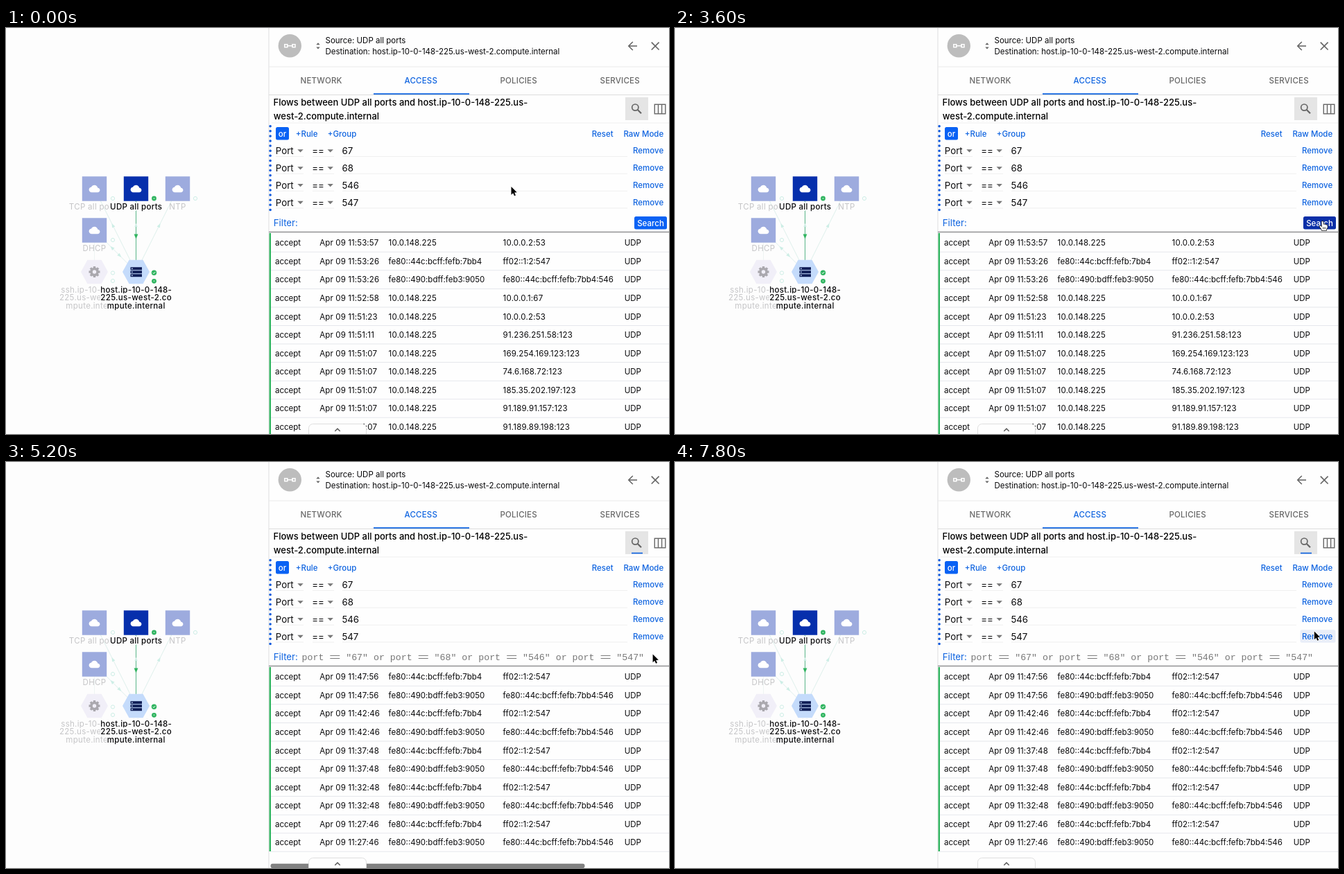
Write an HTML page with a canvas that moves like this. It is 956x586 px and loops after 8 s.

```html
<!DOCTYPE html>
<html lang="en">
<head>
<meta charset="utf-8">
<title>Flow filter</title>
<style>
html, body { margin: 0; width: 100%; height: 100%; overflow: hidden; background: #fdfdfd; }
canvas { display: block; width: 956px; height: 586px; }
</style>
</head>
<body>
<canvas id="stage"></canvas>
<script>
const W = 956, H = 586, LOOP = 8000, STEP = 200;
const UI = 'Inter, sans-serif', MONO = '"Liberation Mono", monospace';
const S = 11.505, L = 13.275;
const INK = '#08080a', BLUE = '#0f64e0', FILL = '#0a62f4', NAVY = '#062fac', GREEN = '#2fb45f', GREY = '#666';
const PALE = '#cdeee6';

const canvas = document.getElementById('stage');
const scale = window.devicePixelRatio || 1;
canvas.width = W * scale;
canvas.height = H * scale;
const c = canvas.getContext('2d');

// y is the middle of the capitals
function text(str, x, y, { size = S, weight = 400, color = INK, family = UI, align = 'left', spacing = 0 } = {}) {
  c.font = `${weight} ${size}px ${family}`;
  c.letterSpacing = spacing + 'px';
  c.textAlign = align;
  c.fillStyle = color;
  c.fillText(str, x, y + size * 0.362);
}

function rect(x, y, w, h, color, r = 0) {
  c.fillStyle = color;
  c.beginPath();
  c.roundRect(x, y, w, h, r);
  c.fill();
}

function disc(x, y, r, color) {
  c.fillStyle = color;
  c.beginPath();
  c.arc(x, y, r, 0, Math.PI * 2);
  c.fill();
}

function ring(x, y, r, color, width = 1) {
  c.strokeStyle = color;
  c.lineWidth = width;
  c.beginPath();
  c.arc(x, y, r, 0, Math.PI * 2);
  c.stroke();
}

function trace(points, closed) {
  c.beginPath();
  points.forEach(([x, y], i) => i ? c.lineTo(x, y) : c.moveTo(x, y));
  if (closed) c.closePath();
}

function line(points, color, width = 1) {
  trace(points);
  c.strokeStyle = color;
  c.lineWidth = width;
  c.stroke();
}

function shape(points, color) {
  trace(points, true);
  c.fillStyle = color;
  c.fill();
}

function arrowHead(x, y, angle, r, color) {
  c.save();
  c.translate(x, y);
  c.rotate(angle);
  shape([[r, 0], [-r, -r * 0.8], [-r, r * 0.8]], color);
  c.restore();
}

// ---- graph ----
const CLOUD = new Path2D('M19.35 10.04C18.67 6.59 15.64 4 12 4 9.11 4 6.6 5.64 5.35 8.04 ' +
  '2.34 8.36 0 10.91 0 14c0 3.31 2.69 6 6 6h13c2.76 0 5-2.24 5-5 0-2.64-2.05-4.78-4.65-4.96z');

function service(x, y, color) {
  rect(x - 17.7, y - 17.7, 35.4, 35.4, color);
  c.save();
  c.translate(x, y);
  c.scale(0.66, 0.66);
  c.translate(-12, -12);
  c.fillStyle = '#fff';
  c.fill(CLOUD);
  c.restore();
}

function hexagon(x, y, color) {
  shape([[-19.5, 0], [-10, -17.3], [10, -17.3], [19.5, 0], [10, 17.3], [-10, 17.3]]
    .map(([dx, dy]) => [x + dx, y + dy]), color);
}

function gear(x, y) {
  c.fillStyle = '#aaa8ae';
  for (let i = 0; i < 8; i++) {
    c.save();
    c.translate(x, y);
    c.rotate(i * Math.PI / 4);
    c.fillRect(-1.7, -8, 3.4, 4);
    c.restore();
  }
  ring(x, y, 4.5, '#aaa8ae', 3.6);
}

function label(lines, x, y, color, solid) {
  lines.forEach((str, i) => {
    const ly = y + i * 11.6;
    if (solid) {
      c.font = `500 ${S}px ${UI}`;
      c.letterSpacing = '0.3px';
      const w = c.measureText(str).width;
      rect(x - w / 2 - 0.5, ly - 6, w + 1, 12, '#fdfdfd');
    }
    text(str, x, ly, { weight: solid ? 500 : 400, color, align: 'center', spacing: 0.3 });
  });
}

function edge(x1, y1, x2, y2, heads) {
  line([[x1, y1], [x2, y2]], '#def0ec', 1);
  const angle = Math.atan2(y2 - y1, x2 - x1);
  for (const [at, turn] of heads)
    arrowHead(x1 + (x2 - x1) * at, y1 + (y2 - y1) * at, angle + turn, 3, PALE);
}

function graph() {
  edge(127.5, 232, 187.5, 352, [[0.44, Math.PI]]);
  edge(247.5, 232, 187.5, 352, [[0.44, Math.PI]]);
  edge(127.5, 292, 187.5, 352, [[0.42, Math.PI], [0.61, 0]]);
  line([[127.5, 310], [127.5, 335]], '#eef4f3');
  line([[187.5, 250], [187.5, 335]], '#63ba90', 1.1);
  arrowHead(187.5, 284.5, -Math.PI / 2, 2.6, PALE);
  arrowHead(187.5, 301, Math.PI / 2, 3.6, GREEN);

  const faded = '#9dabde';
  service(127.5, 232, faded);
  service(247.5, 232, faded);
  service(127.5, 292, faded);
  service(187.5, 232, NAVY);
  hexagon(127.5, 352, '#f1eff8');
  gear(127.5, 352);
  hexagon(187.5, 352, '#c4dbfb');
  for (let i = 0; i < 3; i++) {
    rect(179.5, 345.2 + i * 5, 16.5, 4, '#101f57');
    rect(181, 346.5 + i * 5, 1.6, 1.4, '#c4dbfb');
  }

  for (const [x, y] of [[154, 246], [273, 246], [154, 306], [154, 353.5], [154, 365]]) ring(x, y, 2.6, PALE);
  for (const [x, y, r] of [[213.5, 246, 3.4], [213.5, 353.2, 3.7], [213.5, 365.3, 3.4]]) disc(x, y, r, GREEN);
  line([[211.7, 353.2], [213, 354.6], [215.4, 351.9]], '#fff', 1);
  disc(213.5, 246, 1, '#9fe0b7');
  disc(213.5, 365.3, 1, '#9fe0b7');

  const dim = '#c5c5c7';
  label(['TCP all ports'], 127.5, 257.6, dim);
  label(['NTP'], 247.5, 257.6, dim);
  label(['DHCP'], 127.5, 317.6, dim);
  label(['ssh.ip-10-0-148-', '225.us-west-2.co', 'mpute.internal'], 127.5, 377.5, dim);
  label(['UDP all ports'], 187.7, 257.6, INK, true);
  label(['host.ip-10-0-148-', '225.us-west-2.co', 'mpute.internal'], 187.7, 377.5, INK, true);
}

// ---- panel ----
function header() {
  rect(379, 0, 577, H, '#fefefe');
  rect(378.5, 0, 1, H, '#dededf');
  disc(409.3, 25.7, 16.7, '#bdbdbd');
  line([[405, 25.7], [414, 25.7]], '#fff', 1.5);
  c.strokeStyle = '#fff';
  c.lineWidth = 1.5;
  c.strokeRect(401.8, 23.7, 4, 4);
  c.strokeRect(413, 23.7, 4, 4);
  shape([[447.3, 24.2], [450, 21.2], [452.7, 24.2]], GREY);
  shape([[447.3, 27.6], [450, 30.6], [452.7, 27.6]], GREY);
  text('Source: UDP all ports', 460.5, 18);
  text('Destination: host.ip-10-0-148-225.us-west-2.compute.internal', 460.5, 34.2);
  line([[910, 26], [898, 26]], GREY, 1.6);
  line([[903.8, 20], [897.8, 26], [903.8, 32]], GREY, 1.6);
  line([[930.8, 20.7], [941.6, 31.5]], GREY, 1.7);
  line([[941.6, 20.7], [930.8, 31.5]], GREY, 1.7);

  rect(379, 55.5, 577, 1, '#ececec');
  rect(379, 96, 577, 1, '#dcdcdc');
  const tabs = [['NETWORK', 424.5], ['ACCESS', 574.5], ['POLICIES', 712.5], ['SERVICES', 856.5]];
  for (const [name, x] of tabs)
    text(name, x, 76.3, { weight: 500, color: name === 'ACCESS' ? BLUE : GREY, spacing: 0.2 });
  rect(530, 94.2, 138, 1.8, BLUE);
}

function caret(x, y) {
  shape([[x - 4.2, y - 2], [x + 4.2, y - 2], [x, y + 2.3]], '#777');
}

function link(str, x, y) {
  text(str, x, y, { weight: 500, color: BLUE });
}

function rules(filtered, hover) {
  const title = { size: 13, weight: 500, color: '#000' };
  text('Flows between UDP all ports and host.ip-10-0-148-225.us-', 385.5, 107, title);
  text('west-2.compute.internal', 385.8, 127, title);

  rect(893, 100, 33, 33, '#e5e5e5');
  ring(907.3, 114.6, 4.6, '#666', 1.7);
  line([[910.7, 118], [916, 123.3]], '#666', 2.2);
  if (filtered) rect(902, 130.7, 16, 1.7, BLUE);
  c.strokeStyle = '#666';
  c.lineWidth = 1.4;
  c.strokeRect(935.3, 110.3, 15.5, 13.5);
  line([[940.5, 110], [940.5, 124]], '#666', 1.4);
  line([[945.6, 110], [945.6, 124]], '#666', 1.4);

  rect(383, 136.5, 573, 1, '#f1f1f1');
  for (let i = 0; i < 18; i++) disc(381.1, 141.7 + i * 7.1, 1.77, '#0a58dc');
  rect(389, 143, 19, 18.5, FILL, 2.5);
  text('or', 398.5, 152.6, { color: '#fff', weight: 500, align: 'center' });
  link('+Rule', 417.8, 152.6);
  link('+Group', 463.8, 152.6);
  link('Reset', 844.7, 152.6);
  link('Raw Mode', 890.4, 152.6);

  ['67', '68', '546', '547'].forEach((port, i) => {
    const y = 177.3 + i * 24.85;
    text('Port', 388.8, y, { size: L });
    text('==', 441.2, y, { size: L });
    text(port, 484.4, y, { size: L });
    caret(424.5, y);
    caret(467.7, y);
    for (const [x, w] of [[389, 40], [442, 31], [485, 411]]) rect(x, y + 7.7, w, 1, '#efefef');
    if (hover === 'remove' && i === 3) rect(901.5, y - 9.5, 51, 18.5, '#e9eef8', 2.5);
    link('Remove', 904, y);
  });
}

function filterBar(filtered, hover) {
  text('Filter:', 385.7, 281.3, { size: L, color: BLUE });
  if (filtered) {
    const query = 'port == "67" or port == "68" or port == "546" or port == "547"';
    const x = 426.5, adv = L * 0.6;
    text(query.replaceAll('==', '  '), x, 281, { size: L, color: '#777', family: MONO });
    for (let i = query.indexOf('=='); i >= 0; i = query.indexOf('==', i + 2)) {
      rect(x + i * adv + 1, 278.9, adv * 2 - 2, 1, '#777');
      rect(x + i * adv + 1, 283, adv * 2 - 2, 1, '#777');
    }
  } else {
    rect(906, 272, 47, 18.5, hover === 'search' ? '#0a2fa8' : FILL, 2.5);
    text('Search', 929.5, 281.4, { weight: 500, color: '#fff', align: 'center' });
  }
  rect(379, 293.7, 577, 1.3, '#8f8f92');
  rect(379, 295, 577, 1, '#e4e4e4');
}

const HOST = '10.0.148.225', LINK_A = 'fe80::44c:bcff:fefb:7bb4', LINK_B = 'fe80::490:bdff:feb3:9050';
const toServer = time => [time, LINK_A, 'ff02::1:2:547'];
const toClient = time => [time, LINK_B, LINK_A + ':546'];

const allFlows = [
  ['11:53:57', HOST, '10.0.0.2:53'],
  toServer('11:53:26'),
  toClient('11:53:26'),
  ['11:52:58', HOST, '10.0.0.1:67'],
  ['11:51:23', HOST, '10.0.0.2:53'],
  ['11:51:11', HOST, '91.236.251.58:123'],
  ...['169.254.169.123', '74.6.168.72', '185.35.202.197', '91.189.91.157', '91.189.89.198']
    .map(ip => ['11:51:07', HOST, ip + ':123'])
];
const dhcpFlows = ['11:47:56', '11:42:46', '11:37:48', '11:32:48', '11:27:46']
  .flatMap(time => [toServer(time), toClient(time)]);

function address(str, x, y) {
  text(str, x, y, { spacing: str.includes('.') ? 0.2 : 0 });
}

function table(rows) {
  rows.forEach(([time, from, to], i) => {
    const y = 310.2 + i * 26.55;
    text('accept', 388, y);
    text('Apr 09 ' + time, 452.3, y, { spacing: 0.11 });
    address(from, 551.6, y);
    address(to, 716.6, y);
    text('UDP', 891.7, y);
    rect(382, y + 12.6, 574, 1, '#e5e7ec');
  });
  rect(379.6, 296, 2.4, Math.min(H, 296.5 + rows.length * 26.55) - 296, GREEN);
}

function drawer() {
  c.beginPath();
  c.roundRect(436.5, 571.5, 83, 24, 6);
  c.fillStyle = '#fefefe';
  c.fill();
  c.strokeStyle = '#dedede';
  c.lineWidth = 1;
  c.stroke();
  line([[474.3, 582], [478, 578.3], [481.7, 582]], '#555', 1.4);
}

// ---- pointer ----
const path = [
  [0, 728.5, 229], [200, 730, 230], [1000, 801.3, 279], [1800, 806, 280], [2600, 876.3, 277.5],
  [3200, 932, 278], [5200, 932.6, 277.5], [6400, 922.6, 287.5], [7200, 922.6, 285], [7800, 921.8, 244.5]
];

function pointerAt(t) {
  const i = path.findIndex(p => p[0] > t);
  if (i < 0) return path.at(-1).slice(1);
  const [t0, x0, y0] = path[i - 1], [t1, x1, y1] = path[i];
  const u = (t - t0) / (t1 - t0), k = u * u * (3 - 2 * u);
  return [x0 + (x1 - x0) * k, y0 + (y1 - y0) * k];
}

function outlined(points, fill, stroke, width) {
  trace(points, true);
  c.lineJoin = 'round';
  c.strokeStyle = stroke;
  c.lineWidth = width;
  c.stroke();
  c.fillStyle = fill;
  c.fill();
  c.lineJoin = 'miter';
}

function pointer(x, y, hand) {
  c.save();
  c.translate(x, y);
  c.scale(0.95, 0.95);
  if (hand) {
    outlined([[0.5, 1.5], [2, 1], [3, 2], [3.2, 6], [5, 5.6], [6, 6.5], [7.3, 6.2], [8, 7.2], [9, 7.4],
      [9.2, 10.5], [7.7, 13], [7.5, 15], [0.8, 15], [0, 12.8], [-2.7, 9.5], [-2.4, 8], [-1, 8.2], [0.8, 10]],
      '#fff', '#111', 1.5);
    for (const dx of [2.6, 4.4, 6.2]) line([[dx, 10], [dx, 13]], '#111', 0.7);
  } else {
    outlined([[0, 0], [0, 12.3], [2.8, 9.7], [4.7, 14], [6.8, 13.1], [4.9, 8.9], [8.7, 8.7]], '#000', '#fff', 1.6);
  }
  c.restore();
}

function draw(t) {
  const filtered = t >= 5000;
  const [x, y] = pointerAt(t);
  const onSearch = !filtered && x > 906 && y > 272;
  const onRemove = filtered && y < 261;
  const hover = onSearch ? 'search' : onRemove ? 'remove' : '';

  c.setTransform(scale, 0, 0, scale, 0, 0);
  rect(0, 0, W, H, '#fdfdfd');
  graph();
  header();
  rules(filtered, hover);
  filterBar(filtered, hover);
  table(filtered ? dhcpFlows : allFlows);
  if (filtered && t < 6000) rect(381.5, 579.7, 453, 6.5, '#818181', 3);
  drawer();
  pointer(x, y, onSearch);
}

const start = performance.now();
function tick() {
  const t = (performance.now() - start) % LOOP;
  draw(Math.floor(t / STEP) * STEP);
  requestAnimationFrame(tick);
}
tick();
</script>
</body>
</html>
```
